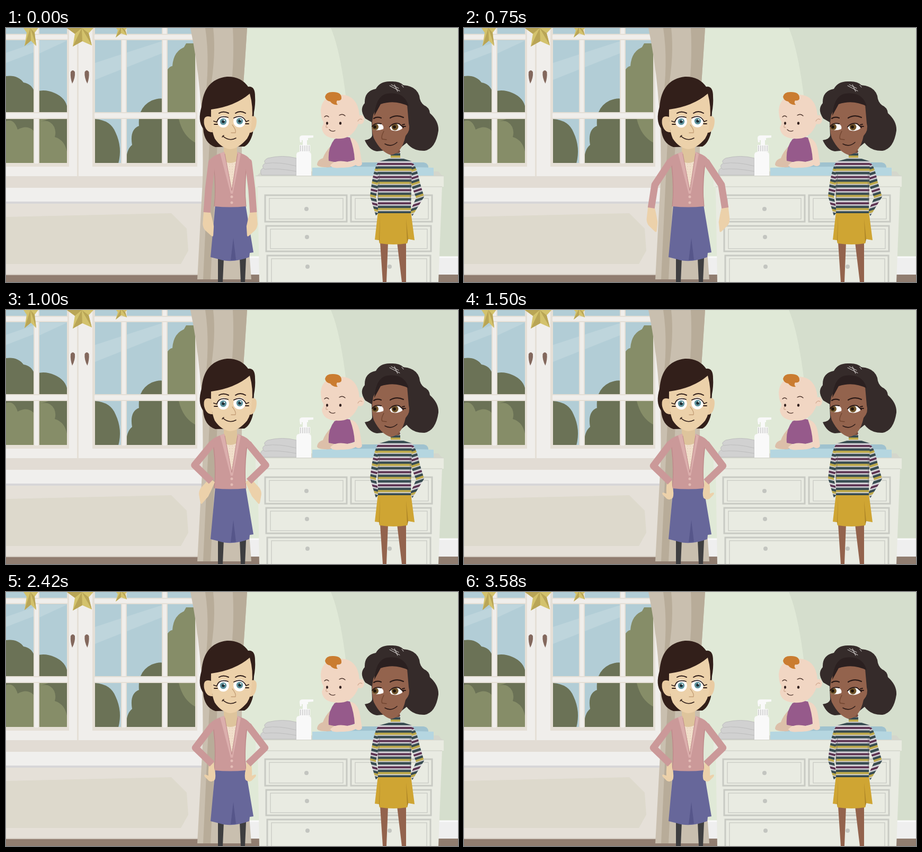
Recreate the animation shown at these times as an HTML page. Size 853x480 px, loop 3660 ms.

```html
<!DOCTYPE html>
<html lang="en">
<head>
<meta charset="utf-8">
<title>Nursery scene</title>
<style>
html, body { margin: 0; width: 100%; height: 100%; overflow: hidden; background: #e0e9d7; }
svg { display: block; width: 100%; height: 100%; }
.line { fill: none; stroke-linecap: round; stroke-linejoin: round; }
</style>
</head>
<body>
<svg viewBox="0 0 853 480" xmlns="http://www.w3.org/2000/svg">
<defs>
  <pattern id="knit" y="241" width="40" height="24.8" patternUnits="userSpaceOnUse">
    <rect width="40" height="25" fill="#d6d4d9"/>
    <rect width="40" height="4.2" fill="#bda94b"/>
    <rect y="6" width="40" height="4.8" fill="#374b50"/>
    <rect y="14" width="40" height="3.8" fill="#5a2f4e"/>
    <rect y="20.4" width="40" height="4.4" fill="#374b50"/>
  </pattern>
  <pattern id="knitLeft" href="#knit" patternTransform="rotate(14 695 290)"/>
  <pattern id="knitRight" href="#knit" patternTransform="rotate(-18 775 290)"/>
  <pattern id="dots" width="5" height="5" patternUnits="userSpaceOnUse">
    <rect width="5" height="5" fill="#f1dfcb"/><circle cx="2" cy="2" r=".7" fill="#dfc3ae"/>
  </pattern>
  <path id="handle" d="M122 83Q126 77 130 83Q131 94 125 105Q121 94 122 83Z" fill="#83685d"/>
</defs>

<!-- wall -->
<rect width="853" height="480" fill="#e0e9d7"/>
<path d="M613 0H853V440H660Q652 90 613 0Z" fill="#d5decd"/>
<rect x="455" y="432" width="398" height="35" fill="#efefef"/>
<path d="M455 433H853" stroke="#fafafa" stroke-width="3"/>
<rect y="466" width="853" height="14" fill="#907d70"/>

<!-- view outside -->
<rect width="362" height="260" fill="#b2cdd6"/>
<path d="M0 47L52 29V46L0 66ZM168 66L294 25V48L168 98ZM63 24H115L63 48Z" fill="#bed5dc"/>
<path d="M0 91Q22 88 33 103Q48 105 54 121Q72 114 92 123Q113 132 116 152V256H0Z" fill="#6b7256"/>
<path d="M0 176Q15 170 22 192Q40 182 52 194L62 178Q82 170 91 187Q95 197 92 206Q113 212 116 240V256H0Z" fill="#868d68"/>
<path d="M63 172H80L63 178Z" fill="#868d68"/>
<path d="M168 172Q198 174 207 198Q220 226 212 256H168Z" fill="#6b7256"/>
<path d="M304 80Q309 72 314 72Q316 42 340 35Q348 29 358 29V256H304Z" fill="#868d68"/>
<path d="M227 256Q226 230 238 221Q233 192 251 185Q248 150 275 137Q297 128 308 140L326 172Q334 205 358 217V256Z" fill="#6b7256"/>
<path d="M304 100V160H358V29H340L316 72Z" fill="#868d68"/>

<!-- window frame -->
<g fill="#f0eeeb">
  <rect x="115" width="53" height="281"/><rect x="357" width="20" height="281"/>
  <rect y="255" width="377" height="26"/>
</g>
<g fill="#e5dfd6">
  <rect x="115" width="4" height="262"/><rect x="163" width="5" height="262"/>
  <rect x="357" width="4" height="262"/>
  <rect y="255" width="119" height="7"/><rect x="163" y="255" width="198" height="7"/>
  <rect x="134" width="3" height="280"/>
</g>
<g id="bars"></g>
<use href="#handle"/><use href="#handle" transform="matrix(-1 0 0 1 278.5 0)"/>

<!-- sill and panelling -->
<rect y="280" width="377" height="23" fill="#e2dcd4"/>
<rect y="302" width="377" height="27" fill="#f0efed"/>
<rect y="328" width="377" height="4" fill="#d7d6d8"/>
<rect y="332" width="377" height="134" fill="#e5e0d8"/>
<path d="M0 357L312 350L341 379L344 421L330 446H0Z" fill="#ddd9cc"/>
<path d="M0 466H365" stroke="#d3ccc2" stroke-width="2"/>

<!-- hanging stars -->
<path d="M31-3L39 9L35 34L47 24L57 34L54 9L63-3ZM112-2L130 11L126 35L144 25L162 33L156 10L167-2ZM206-2L211 4L207 18L217 10L228 14L225 4L230-2Z" fill="#d3c26c"/>
<path d="M46 0L35 34L47 24ZM46 0L57 34L54 9ZM143 0L112-2L130 11ZM143 0L126 35L144 25ZM143 0L162 33L156 10ZM217-2L207 18L217 10ZM217-2L228 14L225 4Z" fill="#b9a556"/>

<!-- curtain -->
<path d="M348 0H455Q449 95 445 145V240L463 475H361L371 290Q375 130 348 0Z" fill="#c9bfaf"/>
<path d="M376 0H391Q397 50 385 120L374 150Q386 65 376 0ZM428 0H455Q449 95 445 145H421Q432 70 428 0Z" fill="#b8ac99"/>
<path d="M384 215H399L386 475H372Z" fill="#b8ac99"/>

<!-- dresser -->
<path d="M475 298H823L816 480H478Z" fill="#e9ebe2"/>
<path d="M482 271L473 280H824L816 271Z" fill="#d4d6cc"/>
<rect x="471" y="279" width="355" height="21" fill="#e9ebe1"/>
<path d="M471 279.5H826M475 300H823" stroke="#d3d5cc" stroke-width="1.5"/>
<g id="drawers" fill="none" stroke="#c8cac3"></g>
<g fill="#c3c5c0"><circle cx="567" cy="342" r="4"/><circle cx="568" cy="395" r="4"/><circle cx="569" cy="451" r="4"/><circle cx="724" cy="451" r="4"/></g>

<!-- towels, bottle, mat -->
<g fill="#d1d1d1" stroke="#bdbdbd" stroke-width="1">
  <path d="M482 278Q477 266 488 264L548 266V278Z"/>
  <path d="M488 267Q480 260 490 255Q520 250 548 256V271Q510 264 488 267Z"/>
  <path d="M490 256Q484 251 494 246Q522 239 548 246V261Q514 252 490 256Z"/>
</g>
<path d="M548 240Q548 234 554 234H570Q576 234 576 240V279H548Z" fill="#f9f9f9"/>
<path d="M554 221H574V234H554ZM560 210H568V221H560ZM554 208Q554 203 560 203H580V207L570 208V212H558V216H555Z" fill="#f9f9f9"/>
<path d="M556 222V233M560 222V233M564 222V233M568 222V233M572 222V233" stroke="#c2c2c2" stroke-width="1.3"/>
<path d="M604 264Q620 254 680 254H788Q798 256 797 265Z" fill="#9fc2cf"/>
<path d="M578 264Q690 260 807 264V279H578Z" fill="#b5d6e0"/>

<!-- baby -->
<path d="M614 222Q602 234 598 246Q588 249 587 258Q588 264 612 263L622 250Z" fill="#dcbfa9"/>
<path d="M644 207Q664 206 668 232L672 257Q669 263 661 260L648 236Z" fill="#f1d6c3"/>
<path d="M620 210Q637 204 649 207Q657 228 658 249Q636 258 609 251Q607 226 620 210Z" fill="#965a8b"/>
<path d="M612 259Q622 248 645 253Q662 249 662 257Q656 264 632 264Q613 266 612 259Z" fill="#f1d6c3"/>
<path d="M594 155Q596 126 632 126Q664 127 667 165Q676 163 676 174Q674 184 665 181Q655 207 632 209Q598 211 596 188Q602 178 597 174Q594 166 594 155Z" fill="#f1d6c3"/>
<path d="M602 130Q604 120 618 121Q632 121 633 131Q634 138 625 137Q622 141 626 145Q617 146 612 139Q603 137 602 130Z" fill="#ca7c30"/>
<g class="line" stroke="#4d352d" stroke-width="1.3"><path d="M601 168Q605 164 609 168M629 165Q635 161 640 166M610 192Q615 197 621 194"/><path d="M664 176Q667 170 672 173M605 183Q602 189 607 188" stroke="#d1a990"/></g>
<g fill="#33211f"><ellipse cx="606" cy="180" rx="2" ry="2.8"/><ellipse cx="631" cy="180" rx="2.2" ry="2.8"/></g>

<!-- friend -->
<path d="M706 405H721L718 480H711ZM738 405H755V480H747Z" fill="#93634d"/>
<path d="M702 347H764L771 401L759 399L757 407Q732 411 705 407L704 401L696 400Z" fill="#cfa533"/>
<path d="M706 352L704 401L705 407ZM755 360L759 399L757 407Z" fill="#ad8528"/>
<path d="M704 252Q693 262 687 318L698 355L704 348L698 319L706 288Z" fill="url(#knitLeft)"/>
<path d="M763 252Q774 256 780 288L789 319L767 355L762 348L774 321L762 290Z" fill="url(#knitRight)"/>
<path d="M726 237L744 232V245L766 252L764 350H702L701 253L726 246Z" fill="url(#knit)"/>
<path d="M705 276L702 322M763 276V330" stroke="#5e5d62" stroke-width=".7"/>
<path d="M678 171Q666 154 677 142Q676 119 698 115Q706 100 726 101Q742 100 750 108Q774 110 780 128Q781 140 789 146Q799 150 800 161Q817 176 816 194Q811 228 790 232Q768 233 756 217L741 229L700 233Q685 231 677 212Q690 210 691 203L690 178Z" fill="#352b2a"/>
<path d="M722 222H743V236L726 238Z" fill="#794e3b"/>
<path d="M704 143Q728 133 757 145L760 180Q764 193 754 204Q747 237 726 240Q707 234 694 208Q688 190 693 164Z" fill="#93634d"/>
<path d="M695 166Q698 128 719 124Q752 119 760 148Q734 135 707 144Z" fill="#2b2020"/>
<path class="line" d="M724 109L743 119M727 107L741 114M733 107L739 120M747 108L750 112" stroke="#e5e2df" stroke-width="1"/>
<path d="M691 187Q695 178 706 180Q714 184 712 191Q701 195 693 192ZM724 188Q728 179 740 180Q748 184 748 190Q738 197 727 193Z" fill="#fff"/>
<circle cx="697" cy="187" r="6" fill="#71552b"/><circle cx="734" cy="187" r="6.5" fill="#71552b"/>
<circle cx="696" cy="187" r="3" fill="#21150d"/><circle cx="733" cy="187" r="3" fill="#21150d"/>
<g class="line" stroke="#2b1a17"><path d="M691 186Q697 178 708 181M724 187Q731 178 742 181L750 188M748 183L752 182M749 186L754 186" stroke-width="2"/><path d="M694 171Q700 167 708 170M725 170Q737 163 750 169" stroke-width="2.2"/><path d="M715 219Q727 226 738 216" stroke-width="1.5"/><path d="M713 195Q707 206 710 210L718 211" stroke="#70442f" stroke-width="1.4"/></g>

<!-- mother -->
<path d="M400 435H411L409 480H400ZM441 435H453L451 480H443Z" fill="#3e3e40"/>
<path d="M395 334H452L467 424L460 425L459 433Q427 445 402 437L386 433Z" fill="#67679a"/>
<path d="M429 397L424 439L434 438Z" fill="#56568a"/>
<path d="M411 224H436V252L425 309L411 252Z" fill="#dec49c"/>
<path d="M409 250Q423 260 438 250L427 310H424Z" fill="url(#dots)"/>
<path d="M404 237L412 234L426 309L437 234L444 237Q456 241 461 249L455 260Q450 300 453 337Q423 340 393 337Q396 300 391 260L385 249Q391 241 404 237Z" fill="#cb9999"/>
<path d="M404 237L412 234L427 309L437 234L443 238L428 313H424Z" fill="#dbaeac"/>
<path d="M413 238L426 307L437 238" class="line" stroke="#b98283" stroke-width=".8"/>
<path d="M392 260Q397 300 393 337M454 260Q449 300 453 337" class="line" stroke="#b98485" stroke-width="1"/>
<circle cx="426" cy="319" r="2.5" fill="#e3bcb6"/><circle cx="426" cy="330" r="2.5" fill="#e3bcb6"/>
<g id="arms"></g>
<path d="M372 190Q361 175 369 149Q373 97 417 92Q443 91 457 111Q470 109 470 129Q471 144 468 159L466 198Q461 218 450 224L395 225Q374 218 372 190Z" fill="#321f1a"/>
<path d="M387 168Q371 163 374 182Q378 198 390 197ZM463 167Q476 164 472 184Q469 198 459 198Z" fill="#e9cba2"/>
<path d="M387 154Q432 148 460 124Q467 149 464 174Q463 197 455 209Q439 228 423 229Q406 227 394 209Q386 191 387 154Z" fill="#ecd1aa"/>
<ellipse cx="410" cy="177" rx="10.8" ry="11.2" fill="#fff"/><ellipse cx="440.5" cy="176.5" rx="11.3" ry="11.2" fill="#fff"/>
<g fill="#5f949f"><circle cx="410" cy="177" r="6.2"/><circle cx="441" cy="176" r="6.2"/></g>
<g fill="#1d2a30"><circle cx="410" cy="177" r="2.8"/><circle cx="441" cy="176" r="2.8"/></g>
<g fill="#fff"><circle cx="412" cy="174.5" r="1.2"/><circle cx="443" cy="173.5" r="1.2"/></g>
<g class="line" stroke="#2d1b17"><path d="M398 177Q402 164 419 169M430 170Q446 162 453 177M398 178L392 176M399 182L393 182M453 177L458 175M452 181L458 181" stroke-width="1.8"/><path d="M402 161Q410 156 420 161M433 161Q442 155 452 161" stroke-width="2"/><path d="M409 204Q421 215 434 208M408 206L411 203" stroke-width="1.6"/><path d="M427 183Q435 193 433 198L425 198" stroke="#c49f78" stroke-width="1.3"/></g>
</svg>

<script>
const LOOP = 3660, STEP = 1000 / 12;
const UPPER = 51.5, FORE = 44, SHOULDER = [388.5, 253.5];
const OPEN_HAND = "M-6-3L-8 22Q-7 30-3 34L8 44Q12 47 12 43L13 26Q10 11 6-3Z";
const BENT_HAND = "M-5-4L3-6L4 8Q8 22 5 30Q0 35-6 32L-14 24Q-16 20-13 20L-7 22Q-8 8-5-4Z";
// time, upper arm angle, forearm angle, hand turn
const POSES = [
  [500, 97, 94, 0],
  [750, 123.4, 99, 2],
  [1000, 129.4, 44, 38],
  [1170, 127.2, 44, 38]
];

function add(parent, tag, attrs) {
  const el = document.createElementNS("http://www.w3.org/2000/svg", tag);
  for (const k in attrs) el.setAttribute(k, attrs[k]);
  return parent.appendChild(el);
}
const byId = id => document.getElementById(id);

function bar(x, y, width, height) {
  add(byId("bars"), "rect", { x, y, width, height, fill: "#e5dfd6" });
  const inset = width > height ? { x, y: y + 2, width, height: height - 4 }
                               : { x: x + 2, y, width: width - 4, height };
  add(byId("bars"), "rect", { ...inset, fill: "#f0eeeb" });
}
for (const x of [52, 217, 294]) bar(x, 0, 11, 256);
for (const [y, h] of [[11, 12], [159, 13]]) {
  bar(0, y, 116, h);
  bar(167, y, 191, h);
}

for (const [x, y, width, height] of [[489, 316, 154, 50], [651, 316, 153, 50], [491, 374, 311, 48], [493, 430, 308, 65]]) {
  add(byId("drawers"), "rect", { x, y, width, height, "stroke-width": 3 });
  add(byId("drawers"), "rect", { x: x + 8, y: y + 6, width: width - 15, height: height - 11, "stroke-width": 1.3 });
}

const arms = [0, 1].map(right => {
  const g = add(byId("arms"), "g", right ? { transform: "matrix(-1 0 0 1 846 0)" } : {});
  return {
    hand: add(g, "path", { fill: "#ecd1aa" }),
    sleeve: add(g, "path", { fill: "none", stroke: "#cb9999", "stroke-width": 13.2, "stroke-linejoin": "round" }),
    cap: add(g, "circle", { cx: SHOULDER[0], cy: SHOULDER[1], r: 6.6, fill: "#cb9999" })
  };
});

function poseAt(t) {
  if (t <= POSES[0][0]) return POSES[0].slice(1);
  const i = POSES.findIndex(p => p[0] > t);
  if (i < 0) return POSES[POSES.length - 1].slice(1);
  const a = POSES[i - 1], b = POSES[i];
  const u = (t - a[0]) / (b[0] - a[0]), e = u * u * (3 - 2 * u);
  return a.slice(1).map((v, k) => v + (b[k + 1] - v) * e);
}

function reach([x, y], length, degrees) {
  const r = degrees * Math.PI / 180;
  return [x + length * Math.cos(r), y + length * Math.sin(r)];
}

function draw(ms) {
  const t = Math.floor((ms % LOOP + 4) / STEP) * STEP;
  const [upper, fore, turn] = poseAt(t);
  const elbow = reach(SHOULDER, UPPER, upper);
  const wrist = reach(elbow, FORE, fore);
  const bent = t > 1080;
  for (const { hand, sleeve } of arms) {
    sleeve.setAttribute("d", `M${SHOULDER}L${elbow}L${wrist}`);
    hand.setAttribute("d", bent ? BENT_HAND : OPEN_HAND);
    hand.setAttribute("transform", `translate(${wrist}) rotate(${bent ? 0 : turn})`);
  }
}

const start = performance.now();
function tick() {
  draw(performance.now() - start);
  requestAnimationFrame(tick);
}
tick();
</script>
</body>
</html>
```
